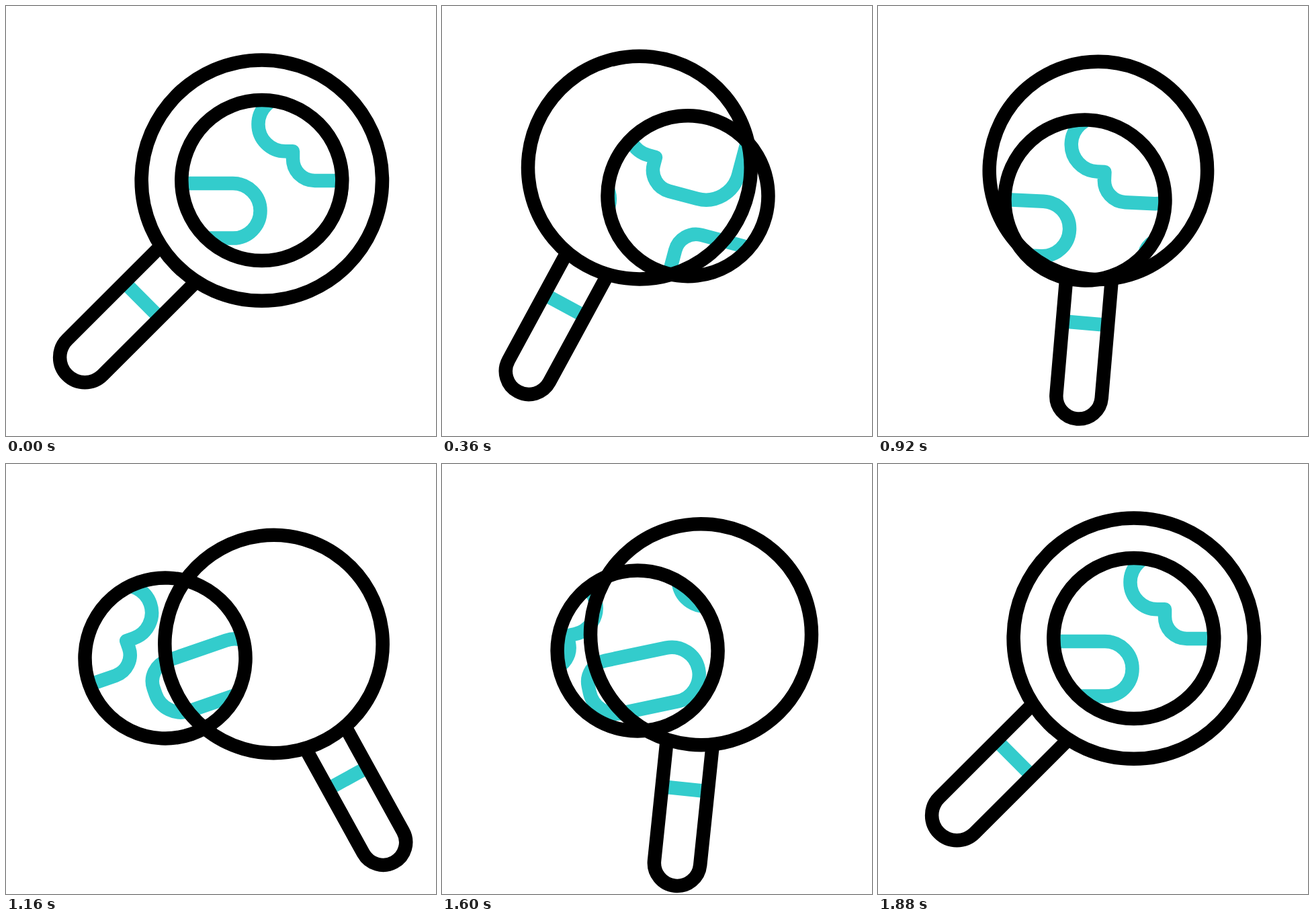
An HTML page for the animation above (2 s loop, 640 px wide and 640 px high).

```html
<!DOCTYPE html>
<html lang="en">
<head>
<meta charset="utf-8">
<title>Globe under a magnifying glass</title>
<style>
  html, body { margin: 0; height: 100%; overflow: hidden; background: #fff; }
  svg { display: block; width: 100%; height: 100%; }
  path, circle { fill: none; stroke: #000; stroke-width: 20.5; stroke-linejoin: round; }
  .teal { stroke: #3cc; }
  #glass * { stroke-width: inherit; }
</style>
</head>
<body>
<svg viewBox="0 0 640 640">
  <clipPath id="disc"><circle r="119"/></clipPath>
  <g id="globe">
    <g clip-path="url(#disc)">
      <g id="land">
        <path id="coast" class="teal" d="M35-124A40.3 40.3 0 0 0 35-43.3H46.2V-32A32.5 32.5 0 0 0 78.7.5H122A50 50 0 0 0 172-49.5V-130"/>
        <use href="#coast" transform="translate(-137) scale(-1 1)"/>
        <path class="teal" d="M-43 4.5A40.75 40.75 0 0 1-43 86H-128A40 40 0 0 1-168 46V36.5A32 32 0 0 1-136 4.5Z"/>
        <path class="teal" d="M110 130V83A32 32 0 0 1 142 51H270"/>
      </g>
    </g>
    <circle r="119.5"/>
  </g>
  <g id="glass">
    <path class="teal" d="M-37 166H37"/>
    <path d="M-37.3 89V286.5A37.3 37.3 0 0 0 37.3 286.5V89"/>
    <circle cy="-86" r="179.2"/>
  </g>
</svg>
<script>
const LOOP = 2000, STEP = 40, STROKE = 20.5, SMALL = 0.905;
const globe = document.getElementById('globe');
const land = document.getElementById('land');
const glass = document.getElementById('glass');

// globe: x, y, angle, land shift; glass: pivot x, y, angle
const home  = { globe: [380.8, 259.6, 0, 0],    glass: [320, 320.4, 45] };
const left  = { globe: [361.9, 289, 19, -137],  glass: [239.6, 310, 23.7] };
const right = { globe: [237, 289, -19, 137],    glass: [436.1, 336.1, -28.9] };

// bow bends the glass's way between two poses
const legs = [
  { start: 80,   end: 480,  from: home,  to: left,  bow: [-1.6, -2.6, 0.3] },
  { start: 720,  end: 1160, from: left,  to: right, bow: [-3.3, 1.2, 4] },
  { start: 1400, end: 1880, from: right, to: home,  bow: [-16.1, 2.1, 7.5] }
];

function ease(t, start, end) {
  const p = Math.min(1, Math.max(0, (t - start) / (end - start)));
  return p * p * (3 - 2 * p);
}

function blend(from, to, u, bow) {
  return from.map((v, i) => v + (to[i] - v) * u + (bow ? bow[i] * 4 * u * (1 - u) : 0));
}

function draw(t) {
  const leg = legs.filter(l => t >= l.start).pop() || legs[0];
  const u = ease(t, leg.start, leg.end);
  const [gx, gy, tilt, shift] = blend(leg.from.globe, leg.to.globe, u);
  const [x, y, angle] = blend(leg.from.glass, leg.to.glass, u, leg.bow);
  const shrink = ease(t, 80, 480) - ease(t, 1540, 1800);
  const size = 1 - (1 - SMALL) * shrink;

  globe.setAttribute('transform', `translate(${gx} ${gy}) rotate(${tilt})`);
  land.setAttribute('transform', `translate(${shift})`);
  glass.setAttribute('transform', `translate(${x} ${y}) rotate(${angle}) scale(${size})`);
  glass.style.strokeWidth = STROKE / size;
}

function tick() {
  const t = performance.now() % LOOP;
  draw(Math.floor(t / STEP) * STEP);
  requestAnimationFrame(tick);
}
tick();
</script>
</body>
</html>
```
